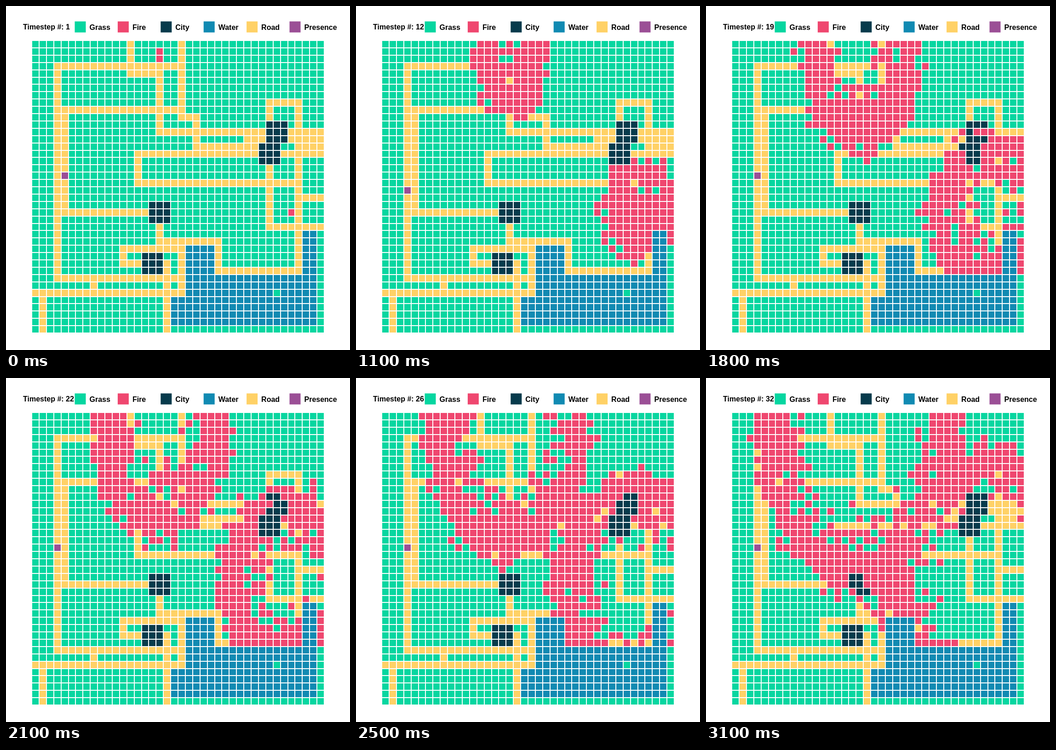
An HTML page with a canvas for the animation above (3.2 s loop, 748 by 748 pixels).

```html
<!DOCTYPE html>
<html lang="en">
<head>
<meta charset="utf-8">
<title>Fire spread</title>
<style>
  html, body { margin: 0; width: 100%; height: 100%; overflow: hidden; background: #fff; }
  canvas { display: block; }
</style>
</head>
<body>
<canvas id="stage" width="748" height="748"></canvas>
<script>
const ctx = document.getElementById('stage').getContext('2d');
const SIZE = 40, PITCH = 15.9, LEFT = 56, TOP = 75;
const STEPS = 32, STEP_MS = 100;
const COLORS = {
  Grass: '#06d6a0', Fire: '#ef476f', City: '#073b4c',
  Water: '#118ab2', Road: '#ffd166', Presence: '#9b4f96'
};

const land = Array.from({ length: SIZE }, () => Array(SIZE).fill('Grass'));

function fillLand(kind, c0, r0, c1, r1) {
  for (let r = Math.min(r0, r1); r <= Math.max(r0, r1); r++)
    land[r].fill(kind, Math.min(c0, c1), Math.max(c0, c1) + 1);
}

// Routes use path commands: M col row, H to column, V to row
function layRoads(route) {
  let c = 0, r = 0;
  for (const [, command, a, b] of route.matchAll(/([MHV])(\d+) ?(\d*)/g)) {
    const toC = command === 'V' ? c : +a;
    const toR = command === 'V' ? +a : command === 'M' ? +b : r;
    if (command === 'M') fillLand('Road', toC, toR, toC, toR);
    else fillLand('Road', c, r, toC, toR);
    [c, r] = [toC, toR];
  }
}

layRoads('M13 0V4H17V12H39 M20 0V10H22V14H30 M20 3H3V32H20 M3 9H20 M4 9V23H15');
layRoads('M29 13H39 M36 14H39 M39 15H14V19H36 M32 17V25H39 M36 21H39');
layRoads('M32 10V8H36V31H25V27H17V25 M14 30H12V28H20V34 M18 30V39 M8 33 M0 34H20 M1 35V39');
for (const [c, r] of [[33, 12], [32, 15], [17, 23], [16, 30]])
  fillLand('City', c - 1, r - 1, c + 1, r + 1);
fillLand('Water', 21, 28, 24, 34);
fillLand('Water', 37, 26, 38, 34);
fillLand('Water', 21, 32, 38, 34);
fillLand('Water', 19, 35, 38, 38);
fillLand('Grass', 33, 34, 33, 34);

// Each spark spreads as an ellipse: steps needed per column and per row
const SPARKS = [
  { c: 17, r: 1, perCol: 2.15, perRow: 1.4 },
  { c: 17, r: 2, perCol: 2.15, perRow: 1.4 },
  { c: 35, r: 23, perCol: 2, perRow: 1.6 }
];
const SHORE = 32;

const noise = (c, r, k) => {
  const v = Math.sin(c * 127.1 + r * 311.7 + k * 74.7) * 43758.5453;
  return v - Math.floor(v);
};

function burnTime(c, r) {
  const city = land[r][c] === 'City';
  const fireproof = r >= SHORE || land[r][c] === 'Water' || (city && noise(c, r, 5) < 0.5);
  if (fireproof) return { start: Infinity, end: Infinity };
  const reach = Math.min(...SPARKS.map(s =>
    Math.hypot((c - s.c) * s.perCol, (r - s.r) * s.perRow)));
  const jitter = (noise(c, r, 1) + noise(c, r, 2) - 1) * Math.min(3, reach / 2);
  const start = reach + jitter;
  const span = city ? 4 : 5 + 11 * noise(c, r, 3) ** 0.6;
  return { start, end: start + span };
}
const burns = land.map((row, r) => row.map((_, c) => burnTime(c, r)));

// Cells sit between two-pixel grid lines snapped to whole pixels
function cell(c, r, kind) {
  const edge = (from, i) => Math.round(from + i * PITCH);
  const x = edge(LEFT, c) + 1, y = edge(TOP, r) + 1;
  ctx.fillStyle = COLORS[kind];
  ctx.fillRect(x, y, edge(LEFT, c + 1) - 1 - x, edge(TOP, r + 1) - 1 - y);
}

function label(text, x, y) {
  ctx.fillStyle = '#000';
  ctx.fillText(text, x, y);
}

function draw(step) {
  ctx.fillStyle = '#fff';
  ctx.fillRect(0, 0, 748, 748);
  ctx.font = 'bold 16px "Liberation Sans", Arial, sans-serif';
  label(`Timestep #: ${step + 1}`, 37, 50.5);
  Object.keys(COLORS).forEach((name, i) => {
    const x = 149.5 + i * 93.4;
    ctx.fillStyle = COLORS[name];
    ctx.fillRect(x, 33.5, 24, 24);
    label(name, x + 32, 51.5);
  });
  for (let r = 0; r < SIZE; r++)
    for (let c = 0; c < SIZE; c++) {
      const { start, end } = burns[r][c];
      cell(c, r, step >= start && step < end ? 'Fire' : land[r][c]);
    }
  // The marker strolls down the road and back
  const stroll = Math.round(3 * Math.exp(-(((step - 8) / 5) ** 2)));
  cell(step ? 3 : 4, 18 + stroll, 'Presence');
}

const origin = performance.now();
function tick() {
  draw(Math.floor((performance.now() - origin) / STEP_MS) % STEPS);
  requestAnimationFrame(tick);
}
tick();
</script>
</body>
</html>
```
